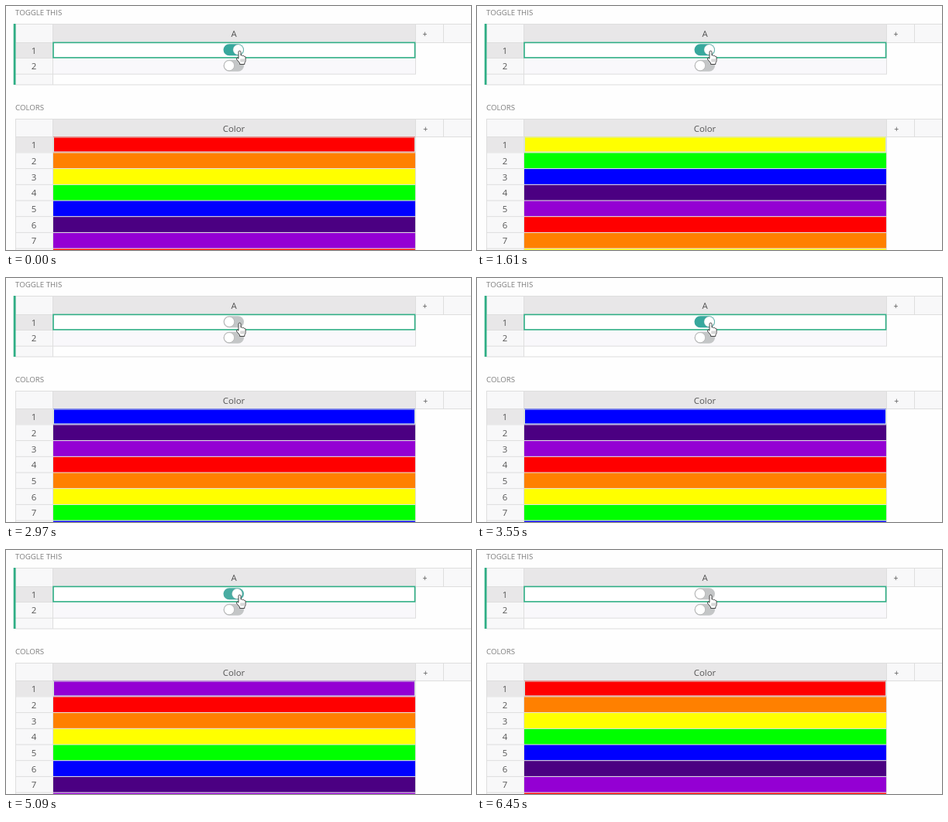
Recreate the animation shown at these times as an HTML page. Size 600x316 px, loop 6.48 s.

```html
<!DOCTYPE html>
<html lang="en">
<head>
<meta charset="utf-8">
<style>
  html, body { margin: 0; width: 100%; height: 100%; overflow: hidden; background: #fefefe; }
  svg { display: block; width: 600px; height: 316px; }
  text { font-family: "Open Sans", "Noto Sans", sans-serif; font-size: 11.4px; fill: #555; text-anchor: middle; }
  .title { font-size: 9.7px; font-weight: 500; fill: #7c7c7c; text-anchor: start; }
  .plus { font-size: 10.5px; }
</style>
</head>
<body>
<svg id="stage" viewBox="0 0 600 316"></svg>
<script>
const LOOP = 6480;
const COLORS = ["#ff0000", "#ff8000", "#ffff00", "#00ff00", "#0000ff", "#4b0082", "#9400d3"];
const CLICKS = [420, 1340, 2100, 2940, 3955, 4930, 5870];
const SLIDE_DELAY = 20, SLIDE_TIME = 180;
const ROWS_TOP = 169.2, ROW_HEIGHT = 20.7;
const GRID = "#dedede", PALE = "#f8f8f9", GREY = "#e8e7e8", GREEN = "#2fae85";
const OFF = [196, 198, 199], ON = [56, 168, 157];
const stage = document.getElementById("stage");

function add(tag, attrs, content) {
  const node = document.createElementNS("http://www.w3.org/2000/svg", tag);
  for (const key in attrs) node.setAttribute(key, attrs[key]);
  if (content !== undefined) node.textContent = content;
  stage.appendChild(node);
  return node;
}
const rect = (x, y, width, height, fill, more) => add("rect", { x, y, width, height, fill, ...more });
const hLine = (x, y, width) => rect(x, y, width, 1, GRID);
const vLine = (x, y, height) => rect(x, y, 1, height, GRID);
const label = (x, y, text, cls = "") => add("text", { x, y, class: cls }, text);

function header(top, height, name, plusX) {
  rect(12, top, 588, height, PALE);
  rect(61, top, 467, height, GREY);
  hLine(12, top - 1, 588);
  hLine(12, top + height, 588);
  [12, 60, 528, 564].forEach(x => vLine(x, top, height));
  label(294, top + 15.8, name);
  label(plusX, top + 15.8, "+", "plus");
}

function toggle(y) {
  const track = rect(280.5, y - 7.5, 26.5, 15, `rgb(${OFF})`, { rx: 7.5 });
  const knob = add("circle", { cx: 288, cy: y, r: 6.6, fill: "#fff", stroke: "#a9a9a9", "stroke-width": 0.7 });
  return { track, knob };
}

// Upper table
label(12, 12, "TOGGLE THIS", "title");
header(24, 23, "A", 540.5);
rect(12, 48, 48, 54, PALE);
rect(12, 48, 48, 19, GREY);
rect(61, 68, 467, 20, "#f9f8fb");
hLine(12, 67, 48);
hLine(12, 87.7, 517);
hLine(12, 101.5, 588);
vLine(60, 48, 54);
vLine(528, 48, 40);
rect(9.7, 23, 2.8, 79, GREEN);
rect(61, 47.4, 466.6, 19.5, "#fff", { stroke: GREEN, "stroke-width": 1.6 });
label(36, 61.5, "1");
label(36, 82.4, "2");
const mainToggle = toggle(56.7);
toggle(77.2);

// Lower table
label(12, 134.5, "COLORS", "title");
header(147, 22, "Color", 541.2);
rect(12, 170, 48, 146, PALE);
rect(12, 170, 48, 19, GREY);
const bars = [];
for (let i = 0; i < 8; i++) {
  const top = ROWS_TOP + i * ROW_HEIGHT;
  bars.push(rect(61, top, 467, ROW_HEIGHT, COLORS[i % 7]));
  if (i) {
    hLine(12, top - 0.5, 48);
    rect(61, top - 0.5, 467, 1, "#e6e6e6");
  }
  if (i < 7) label(36, top + 15, i + 1);
}
[12, 60, 528].forEach(x => vLine(x, 170, 146));
rect(61.5, 170, 466, 18.9, "none", { stroke: "#d5e6df", "stroke-width": 1 });

// Pointer
add("path", {
  d: "M299.4 67V59.2q0-1.6 1.5-1.6t1.5 1.6V63.5q1.7-.8 2.2.6 1.6-.6 2 .6 1.9-.4 1.9 1.5V70q0 2-1.3 3.3V75H301v-1.6L297 68.6q-.8-1.7.8-1.9.8 0 1.6 1Z",
  fill: "#fff", stroke: "#333", "stroke-width": 0.9, "stroke-linejoin": "round", transform: "translate(.6 .5)"
});
add("path", { d: "M303.2 68.5v4M305.2 68.5v4M307 68.5v4", stroke: "#666", "stroke-width": 0.5 });

const ease = p => p * p * (3 - 2 * p);

function draw(time) {
  const shift = CLICKS.filter(click => time >= click).length;
  bars.forEach((bar, i) => bar.setAttribute("fill", COLORS[(i + shift) % 7]));

  let on = 1;
  if (shift) {
    const raw = (time - CLICKS[shift - 1] - SLIDE_DELAY) / SLIDE_TIME;
    const progress = ease(Math.min(1, Math.max(0, raw)));
    on = shift % 2 ? 1 - progress : progress;
  }
  mainToggle.knob.setAttribute("cx", 288 + 11.6 * on);
  mainToggle.knob.setAttribute("stroke-opacity", 1 - 0.6 * on);
  const mix = OFF.map((c, i) => Math.round(c + (ON[i] - c) * on));
  mainToggle.track.setAttribute("fill", `rgb(${mix})`);
}

const start = performance.now();
function tick() {
  draw((performance.now() - start) % LOOP);
  requestAnimationFrame(tick);
}
tick();
</script>
</body>
</html>
```
